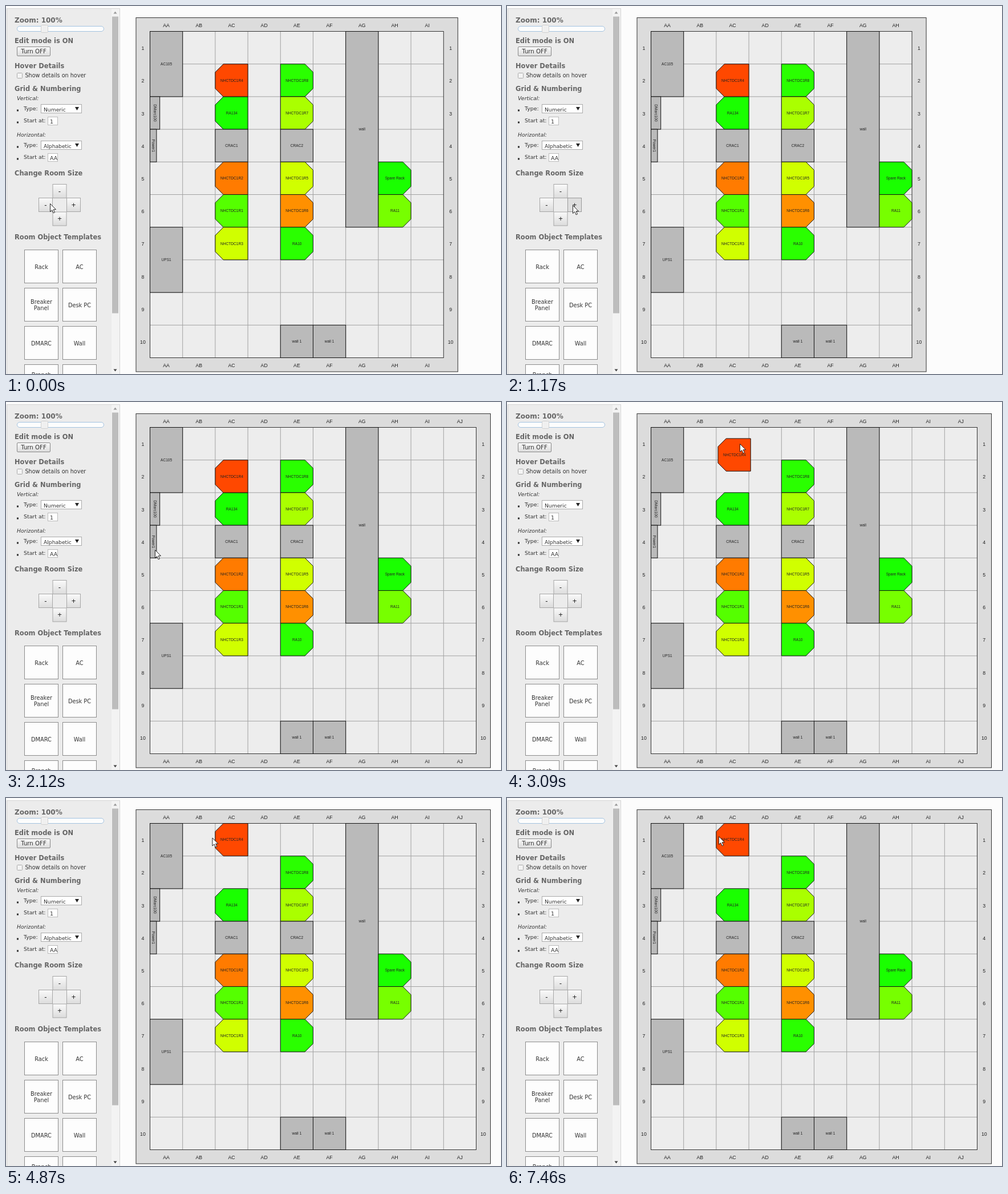
Animation of 868x645 px, one loop 8 s. Source, as an HTML page:

```html
<!DOCTYPE html>
<html lang="en">
<head>
<meta charset="utf-8">
<title>Room editor</title>
<style>
html, body { margin: 0; width: 100%; height: 100%; overflow: hidden; background: #fcfcfc; }
svg { display: block; }
text { font-family: "DejaVu Sans", sans-serif; fill: #333; }
.head { font-weight: bold; fill: #666; }
.room text, .btn text { font-family: "Liberation Sans", Arial, sans-serif; fill: #222; }
.btn rect { fill: url(#face); stroke: #a6a6a6; }
.btn.down rect { fill: #dedede; stroke: #999; }
</style>
</head>
<body>
<svg width="868" height="645" viewBox="0 0 868 645">
  <defs>
    <linearGradient id="face" x2="0" y2="1">
      <stop stop-color="#fafafa"/><stop offset="1" stop-color="#dcdcdc"/>
    </linearGradient>
  </defs>
  <g id="panel"></g>
  <g id="room" class="room"></g>
  <g id="objects" class="room"></g>
  <g id="moving" class="room"></g>
  <path id="cursor" d="M0 0V14L3.3 11 5.6 16.3 8 15.3 5.7 10.2H10Z" fill="#fff" stroke="#111" stroke-width=".9"/>
</svg>
<script>
const CELL = 57.2, LEFT = 252.5, TOP = 44.5, ROWS = 10;
const el = id => document.getElementById(id);

const rect = (x, y, w, h, fill, stroke = 'none', extra = '') =>
  `<rect x="${x}" y="${y}" width="${w}" height="${h}" fill="${fill}" stroke="${stroke}" ${extra}/>`;
const text = (s, x, y, size, extra = '') =>
  `<text x="${x}" y="${y}" font-size="${size}" ${extra}>${s}</text>`;
const centred = (s, x, y, size, extra = '') =>
  text(s, x, y + size * .36, size, `text-anchor="middle" ${extra}`);

// ---- Side panel ----
const heading = (s, y) => text(s, 15, y, 11.45, 'class="head"');

const button = (id, label, x, y) =>
  `<g class="btn" id="${id}">${rect(x, y, 24, 24)}${centred(label, x + 12, y + 11.5, 13)}</g>`;

function numbering(name, type, start, y) {
  const bullet = dy => rect(19, y + dy, 3, 3, '#333');
  return text(name, 19, y, 9.4, 'font-style="italic"') +
    bullet(17) + text('Type:', 31, y + 18.5, 9.4) +
    rect(61.5, y + 8, 71, 15, '#fff', '#aaa') + text(type, 66, y + 20, 9.2) +
    `<path d="M121 ${y + 12.5}h7l-3.5 6z" fill="#222"/>` +
    bullet(38) + text('Start at:', 31, y + 39.5, 9.4) +
    rect(73.5, y + 30, 17, 14, '#fff', '#bbb') + text(start, 77, y + 41, 9.4);
}

function template(label, i) {
  const x = 32.5 + i % 2 * 67, y = 427.5 + (i >> 1) * 67, lines = label.split(' / ');
  return rect(x, y, 59, 58, '#fdfdfd', '#8c8c8c') +
    lines.map((s, k) => centred(s, x + 29.5, y + 29.5 + (k - (lines.length - 1) / 2) * 11.5, 9.8)).join('');
}

function panel() {
  const labels = ['Rack', 'AC', 'Breaker / Panel', 'Desk PC', 'DMARC', 'Wall', 'Branch / Circuit / Panel', ''];
  return rect(1.5, 4.5, 198, 660, '#ececec', '#d4d4d4') +
    rect(185, 5, 14, 640, '#f3f3f3') + rect(186, 18.5, 11, 520, '#bdbdbd') +
    '<path d="M188.5 13.5h6l-3-4z" fill="#999"/><path d="M188.5 636.5h6l-3 4z" fill="#444"/>' +
    text('Zoom: 100%', 15, 29, 12, 'class="head"') +
    rect(19.5, 35.5, 152, 9, '#fdfdfd', '#a3c3e0', 'rx="4.5"') +
    rect(61.5, 33.5, 12, 13, '#f0f0f0', '#d0d0d0', 'rx="2"') +
    heading('Edit mode is ON', 65) +
    rect(19.5, 71.5, 58, 16, 'url(#face)', '#888', 'rx="1.5"') + centred('Turn OFF', 48.5, 79.5, 10.2) +
    heading('Hover Details', 109) +
    rect(19.5, 117.5, 9, 9, '#f4f4f4', '#aaa', 'rx="1"') + text('Show details on hover', 33.5, 125, 9.65) +
    heading('Grid &amp; Numbering', 149) +
    numbering('Vertical:', 'Numeric', '1', 164.5) +
    numbering('Horizontal:', 'Alphabetic', 'AA', 228.5) +
    heading('Change Room Size', 297) +
    button('up', '-', 82, 312.5) + button('less', '-', 57.5, 336.5) +
    button('more', '+', 106.5, 336.5) + button('down', '+', 82, 361) +
    heading('Room Object Templates', 409) + labels.map(template).join('');
}

// ---- Room ----
function room(cols) {
  const w = cols * CELL, h = ROWS * CELL, right = LEFT + w, bottom = TOP + h;
  let lines = '', names = '';
  for (let c = 0; c < cols; c++) {
    const x = LEFT + c * CELL;
    if (c) lines += `M${x} ${TOP}V${bottom}`;
    for (const y of [33.5, 629.5]) names += centred('A' + String.fromCharCode(65 + c), x + CELL / 2, y, 8.8);
  }
  for (let r = 0; r < ROWS; r++) {
    const y = TOP + r * CELL;
    if (r) lines += `M${LEFT} ${y}H${right}`;
    for (const x of [240, right + 12.3]) names += centred(r + 1, x, y + CELL / 2 + 1, 8.8);
  }
  return rect(228, 20.5, w + 49.5, 620.5, '#dcdcdc', '#333') +
    rect(LEFT, TOP, w, h, '#ededed') +
    `<path d="${lines}" stroke="#a2a2a2" fill="none"/>` +
    rect(LEFT, TOP, w, h, 'none', '#333') + names;
}

function box(label, c, r, w = 1, h = 1) {
  const x = LEFT + c * CELL, y = TOP + r * CELL, bw = w * CELL, bh = h * CELL;
  const cx = x + bw / 2, cy = y + bh / 2;
  return rect(x, y, bw, bh, '#bababa', '#111') +
    centred(label, cx, cy, 6.6, w < 1 ? `transform="rotate(90 ${cx} ${cy})"` : '');
}

// side: -1 cuts the left corners, 1 the right ones
function rack(label, hue, side, x, y, w = CELL) {
  const k = CELL / 4, flat = w - k;
  const d = side < 0
    ? `M${x + k} ${y}h${flat}v${CELL}h${-flat}l${-k} ${-k}v${-2 * k}z`
    : `M${x} ${y}h${flat}l${k} ${k}v${2 * k}l${-k} ${k}h${-flat}z`;
  return `<path d="${d}" fill="hsl(${hue} 100% 50%)" stroke="#111"/>` +
    centred(label, x + w / 2 + .4, y + CELL / 2, 6.6);
}

// A column of neighbours: "name:hue" is a rack, a bare name is a box
const stack = (col, row, side, items) => items.split(' ').map((item, i) => {
  const [name, hue] = item.replace('_', ' ').split(':'), r = row + i;
  return hue ? rack(name, hue, side, LEFT + col * CELL, TOP + r * CELL) : box(name, col, r);
}).join('');

const objects = () =>
  box('AC105', 0, 0, 1, 2) + box('DMarc100', 0, 2, .3) + box('Power1', 0, 3, .2) +
  box('UPS1', 0, 6, 1, 2) + box('wall', 6, 0, 1, 6) + box('wall 1', 4, 9) + box('wall 1', 5, 9) +
  stack(2, 2, -1, 'RA134:114 CRAC1 NHCTDC1R2:29 NHCTDC1R1:100 NHCTDC1R3:71') +
  stack(4, 1, 1, 'NHCTDC1R8:110 NHCTDC1R7:80 CRAC2 NHCTDC1R5:71 NHCTDC1R6:34 RA10:110') +
  stack(7, 4, 1, 'Spare_Rack:114 RA11:92');

// ---- Motion ----
const HOME = LEFT + 2 * CELL, STEP = 125;
const DRAG = 2950, DROP = 4120, RESIZE = 5520;

// arrival time, x, y, number of steps on the way there
const stops = [
  [910, 115, 349, 3], [2120, 261, 259, 1], [2370, 391, 187, 2], [2510, 404, 111, 1],
  [DRAG, 407, 102, 1], [3090, 408, 73, 1], [3860, 403, 53, 6], [5120, 355, 72, 6],
  [RESIZE, 364, 73, 1], [5790, 341, 73, 2], [6090, 345, 73, 1], [6730, 365, 68, 5],
  [7310, 369, 67, 1], [7460, 371, 67, 1]];

function pointer(t) {
  let x = 77, y = 346;
  for (const [end, toX, toY, n] of stops) {
    const done = Math.min(n, Math.max(0, Math.floor((t - end) / STEP) + n));
    const ease = Math.sin(done / n * Math.PI / 2);
    x += (toX - x) * ease;
    y += (toY - y) * ease;
  }
  return [x, y];
}

// press time, release time, button, change in columns
const clicks = [[250, 520, 'less', -1], [1170, 1330, 'more', 1], [1750, 2120, 'more', 1]];

function movingRack(t, px, py) {
  let x = HOME, y = t < DRAG ? TOP + CELL : TOP, w = CELL;
  if (t >= DRAG && t < DROP) {
    x = px - 38;
    y = Math.max(TOP, py - 9);
  } else if (t >= RESIZE) {
    // the left edge follows the pointer in eighths of a cell
    const unit = CELL / 8, pull = Math.min(0, Math.floor((px - 2 - HOME) / unit)) * unit;
    x += pull;
    w -= pull;
  }
  return rack('NHCTDC1R4', 17, -1, x, y, w);
}

let shownCols;
function draw(t) {
  let cols = 9, held = '';
  for (const [down, up, id, change] of clicks) {
    if (t >= up) cols += change;
    else if (t >= down) held = id;
  }
  if (cols !== shownCols) el('room').innerHTML = room(shownCols = cols);
  for (const id of ['less', 'more']) el(id).classList.toggle('down', id === held);

  const [px, py] = pointer(t);
  el('moving').innerHTML = movingRack(t, px, py);
  el('cursor').setAttribute('transform', `translate(${px + .5} ${py + .5})`);
}

el('panel').innerHTML = panel();
el('objects').innerHTML = objects();
const start = performance.now();
function loop() {
  draw((performance.now() - start) % 8000);
  requestAnimationFrame(loop);
}
loop();
</script>
</body>
</html>
```
